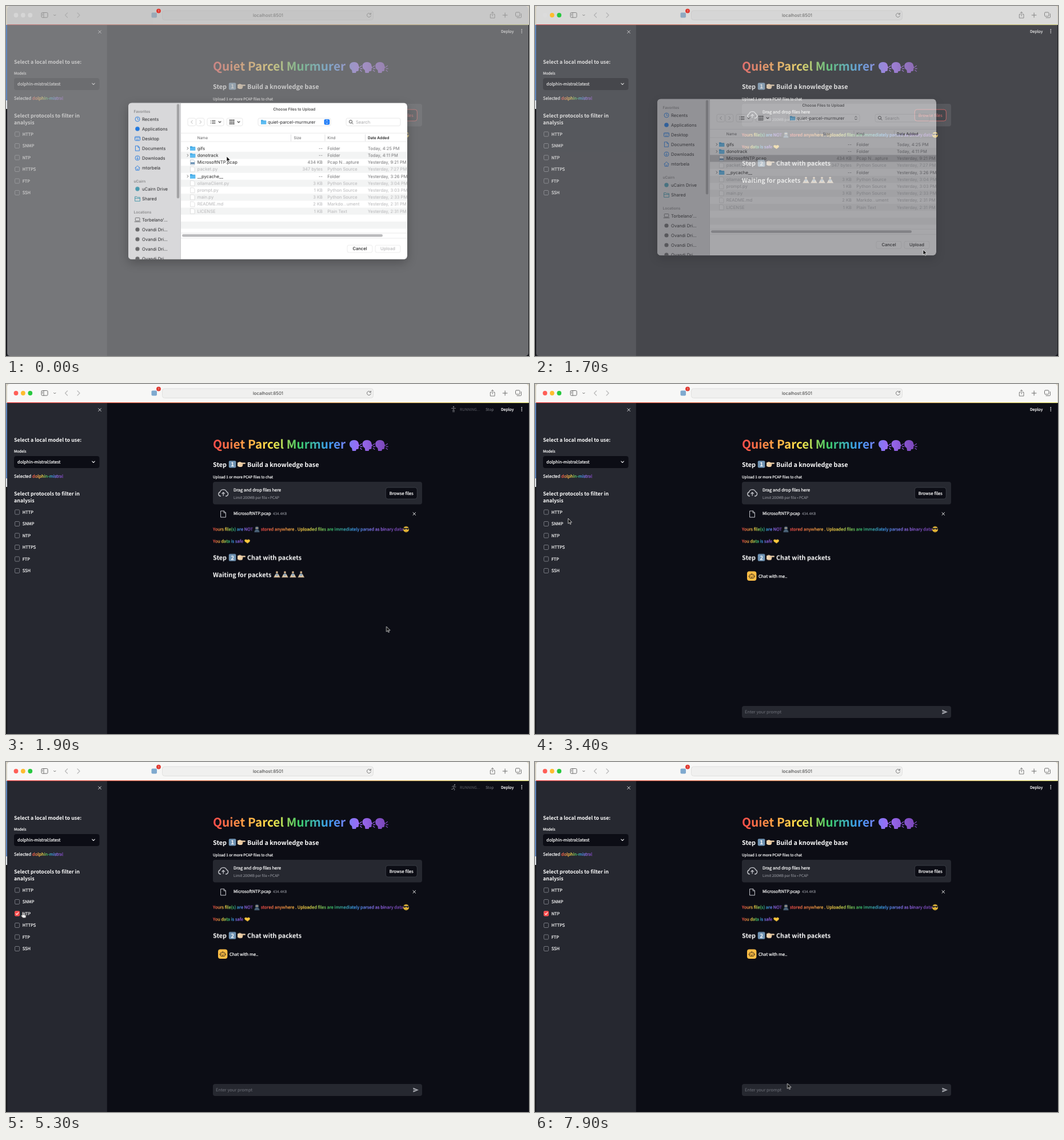
Write an HTML page that moves like this. It is 915 by 612 pixels and loops after 8 s.

```html
<!DOCTYPE html>
<html lang="en">
<head>
<meta charset="utf-8">
<title>Packet upload</title>
<style>
html,body{margin:0;width:100%;height:100%;overflow:hidden;background:#0c0d15}
svg{display:block;width:915px;height:612px;text-rendering:geometricPrecision}
text{white-space:pre}
.page{font-family:"Noto Sans CJK JP","Noto Sans CJK SC","Noto Sans CJK",Lato,sans-serif;font-weight:500;fill:#fafafa}
.page text{stroke-width:.22}
.page text:not([fill],.b){stroke:#fafafa}
.ui{font-family:Inter,"Liberation Sans",sans-serif}
.b{font-weight:700}
.ln{fill:none;stroke-linecap:round;stroke-linejoin:round}
.veil{animation:veil 8s linear infinite}
.sheet{animation:sheet 8s linear infinite}
.ptr{animation:ptr 8s ease-in-out infinite}
.lower{animation:lower 8s step-end infinite}
.pose{animation:pose .8s step-end infinite}
.pose2{animation-delay:-.4s}
@keyframes veil{0%,20%{opacity:.613}21.25%{opacity:.373}23.5%,100%{opacity:0}}
@keyframes sheet{0%,1.2%{transform:translateY(.8px);opacity:1}1.25%,20%{transform:none;opacity:1}
 21.25%{transform:translateY(-6px);opacity:.53}22.5%{transform:translateY(-9px);opacity:.1}
 23.5%,100%{transform:translateY(-10px);opacity:0}}
@keyframes lower{0%{transform:translateY(-28.6px)}22.4%{transform:none}}
@keyframes pose{0%{opacity:1}50%{opacity:0}}
@keyframes ptr{0%,3.7%{transform:translate(386px,263px)}6%,7.5%{transform:translate(384px,271px)}
 17.5%,21.6%{transform:translate(679px,426px)}23.7%,26%{transform:translate(665.5px,424px)}
 40%{transform:translate(62px,237px)}42.5%{transform:translate(58px,235px)}
 48.7%{transform:translate(44px,262px)}51.2%{transform:translate(37px,283px)}
 55%,67.5%{transform:translate(29.5px,262.5px)}74%{transform:translate(560px,470px)}
 80%,90.5%{transform:translate(445px,524px)}98.7%,100%{transform:translate(441.5px,562px)}}
</style>
</head>
<body>
<script>
const BODY = 7.5, SMALL = 6.42, HEAD = 10.85, SIDE = 8.9;
const PAGE = 'fill="#0c0d15"', PANEL = 'fill="#262830"';
let css = '', defs = '', count = 0;

const text = (x, y, s, size, attr = '') => `<text x="${x}" y="${y}" font-size="${size}" ${attr}>${s}</text>`;
const rect = (x, y, w, h, r, attr) => `<rect x="${x}" y="${y}" width="${w}" height="${h}" rx="${r}" ${attr}/>`;
const dot = (x, y, r, fill) => `<circle cx="${x}" cy="${y}" r="${r}" fill="${fill}"/>`;
const line = (d, color, w = 1) => `<path class="ln" d="${d}" stroke="${color}" stroke-width="${w}"/>`;
const shape = (d, fill) => `<path d="${d}" fill="${fill}"/>`;

// Shows its body between two times in ms.
function during(from, to, body) {
  const name = 'show' + count++;
  css += `@keyframes ${name}{0%{opacity:${from ? 0 : 1}}${from ? `${from / 80}%{opacity:1}` : ''}${to < 8000 ? `${to / 80}%{opacity:0}` : ''}100%{opacity:0}}`;
  return `<g style="animation:${name} 8s step-end infinite">${body}</g>`;
}

function rainbow(x1, x2) {
  const id = 'rain' + count++;
  const stops = ['#ff4b4b', '#ff9a45', '#ffe34a', '#3dc968', '#3d9df3', '#9a6cf5', '#7a45b5']
    .map((c, i) => `<stop offset="${i / 6}" stop-color="${c}"/>`).join('');
  defs += `<linearGradient id="${id}" gradientUnits="userSpaceOnUse" x1="${x1}" x2="${x2}" y1="0" y2="0">${stops}</linearGradient>`;
  return `url(#${id})`;
}

function rainText(x, y, s, w) {
  const paint = rainbow(x, x + w);
  return text(x, y, s, BODY, `fill="${paint}" stroke="${paint}"`);
}

// Browser toolbar
function toolbar() {
  const k = '#6b6b6b', pale = '#b9b9b9';
  return shape('M2 32.5V5Q2 0 7 0H909Q914 0 914 5V32.5Z', '#f7f7f6') +
    rect(273.5, 8, 369, 16.5, 4, 'fill="#f0f0ef" stroke="#e0e0df"') +
    rect(62, 11.5, 11, 8.6, 1.6, `fill="none" stroke="${k}"`) + line('M66 11.5V20M63.6 14H64.4M63.6 16H64.4', k, .9) +
    line('M83.6 15.3L85.3 17 87 15.3', k) +
    line('M107.5 12L103.5 16 107.5 20', pale, 1.2) + line('M125 12L129 16 125 20', pale, 1.2) +
    rect(254.5, 11.5, 9.5, 9, 2, 'fill="#7fa9cf"') +
    line('M638 14.2A3.5 3.5 0 1 0 638.4 17M638.4 12.2V14.6H636', k, .9) +
    line('M849 14.5H847.3V21H855V14.5H853.3M851.1 17.5V10.5M849 12.4L851.1 10.3 853.2 12.4', k, .9) +
    line('M869.2 16H877M873.1 12V20', k) +
    rect(891.5, 11, 7.5, 7, 1.5, `fill="none" stroke="${k}"`) + line('M894 20.5H900.3Q901.5 20.5 901.5 19.3V13.6', k, .9) +
    text(458.5, 18.8, 'localhost:8501', 7.8, 'class="ui" text-anchor="middle" fill="#3c3c3c"') +
    rect(2, 32, 912, 1.2, 0, 'fill="url(#stripe)"');
}

// Parts of the toolbar that the veil leaves bright
function lights() {
  const dots = (colors) => colors.map((c, i) => dot(17.5 + i * 12.4, 16, 3.9, c)).join('');
  const [red, yellow, green] = ['#ff5f57', '#febc2e', '#28c840'];
  return during(0, 1190, dots(['#d6d6d6', '#d6d6d6', '#d6d6d6'])) +
    during(1190, 1790, dots(['#dcdcdc', yellow, green])) +
    during(1790, 8000, dots([red, yellow, green])) +
    dot(267, 8.6, 3.9, '#e0382f') + text(267, 10.9, '!', 6, 'class="ui" text-anchor="middle" fill="#fff"');
}

// Page sidebar
function sidebar() {
  const box = (s, i) => rect(15.6, 220 + i * 20.5, 8, 8, 1.4, 'fill="none" stroke="#8b8d95" stroke-width=".8"') +
    text(28.7, 226.6 + i * 20.5, s, BODY);
  return line('M161.6 42.8L166.4 47.6M166.4 42.8L161.6 47.6', '#e8e8ea', .9) +
    text(14, 100.6, 'Select a local model to use:', SIDE, 'class="b"') +
    text(14, 120.3, 'Models', SMALL) +
    rect(14, 126, 149.5, 21, 4, PAGE) + text(20, 139, 'dolphin-mistral:latest', BODY) +
    line('M150.7 135.2L153 137.5 155.3 135.2', '#e8e8ea', 1.1) +
    text(14, 164, 'Selected', BODY) + rainText(46, 164, 'dolphin-mistral', 53) +
    text(14, 194.8, 'Select protocols to filter in', SIDE, 'class="b"') +
    text(14, 207, 'analysis', SIDE, 'class="b"') +
    ['HTTP', 'SNMP', 'NTP', 'HTTPS', 'FTP', 'SSH'].map(box).join('') +
    during(4590, 8000, rect(15.2, 260.6, 8.8, 8.8, 1.6, 'fill="#ff4b4b"') + line('M17.5 265.2L19 266.8 21.9 263.2', '#fff', 1.1));
}

// Small pictograms
const keycap = (y, n) => rect(389.8, y - 6.2, 12.6, 12.4, 2, 'fill="#6f93b3"') +
  text(396.1, y + 4, n, 10, 'class="b" text-anchor="middle"');
const point = (y) => `<g transform="translate(405 ${y})">` +
  shape('M0-3L4-4.5 8-3H12.6Q14-3 14-1.8T12.6-.6H9Q10 1 9 2.2 9 4.6 6.5 4.6H3L0 3Z', '#f1d3ac') +
  line('M5.5-.6H9M5.8 1.4H8.6', '#c39a6b', .5) + '</g>';
const talker = (x, fill) => shape(`M${x} 98c5 0 8 3 8 7l2 3-2 1v3c0 2-2 2-4 2l-1 3h-6l-1-5c-3-2-4-4-4-7 0-4 3-7 8-7z`, fill) +
  line(`M${x + 10.6} 106.5l2.6-2M${x + 11} 109.5h3M${x + 10.6} 112.3l2.6 2`, fill, 1.3);
const sitter = (x) => `<g transform="translate(${x} 333)">` + dot(0, -3.8, 1.9, '#d9b78f') +
  shape('M0-2L3 0 4.4 3.2 6 5H-6L-4.4 3.2-3 0Z', '#e8cda8') + shape('M-2.2-1.4H2.2V2.6H-2.2Z', '#8fa6b8') + '</g>';

function runner() {
  const c = '#74767d', head = (x, y) => dot(x, y, 1.2, c);
  return `<g class="pose">${head(783, 40) + line('M779.5 42.5H786.5M783 42.5V45.5M782 49V45.5M784 49V45.5', c, 1)}</g>` +
    `<g class="pose pose2">${head(785, 40) + line('M780.3 43.5L782 42 784.5 42.3 785.6 44 787 43.5M784 42.5L782.6 45.6 785 47 784.4 49.4M782.6 45.6L781.8 47.6H779.4', c, 1)}</g>` +
    text(794, 46.5, 'RUNNING...', 6.6, 'fill="#5d5f66"') + text(839, 46.5, 'Stop', 6.6, 'fill="#83858c"');
}

// Page body
function body() {
  const title = rainbow(362, 667);
  const heading = (y, n, s) => text(362, y + 4.3, 'Step', HEAD, 'class="b"') + keycap(y, n) + point(y) + text(422, y + 4.3, s, HEAD, 'class="b"');
  const browse = (edge, attr = '') => rect(664.3, 181, 55, 20, 4, `${PAGE} stroke="${edge}" stroke-width=".8"`) +
    text(691.8, 193.6, 'Browse files', BODY, 'text-anchor="middle" ' + attr);
  const agent = rect(371, 327.6, 16.4, 16.4, 4, 'fill="#ffbd45"') +
    rect(375.3, 333, 7.8, 6.6, 1.4, 'fill="none" stroke="#3a2f1a"') +
    line('M379.2 333V331.2M374 335.8V337M384.4 335.8V337M377.7 337.8H380.7', '#3a2f1a', .9) +
    dot(377.5, 335.6, .7, '#3a2f1a') + dot(380.9, 335.6, .7, '#3a2f1a');
  return during(1790, 3090, runner()) + during(4590, 5390, runner()) +
    text(866, 46.5, 'Deploy', 6.8) + [41.2, 44, 46.8].map(y => dot(902.3, y, .9, '#f0f0f0')).join('') +
    text(362, 113, 'Quiet Parcel Murmurer', 20.8, `class="b" fill="${title}"`) +
    [0, 1, 2].map(i => talker(609 + i * 22.6, title)).join('') +
    heading(140.4, 1, 'Build a knowledge base') +
    text(362, 165.2, 'Upload 1 or more PCAP files to chat', SMALL) +
    rect(362, 171, 366, 39.6, 4, PANEL) +
    line('M375.5 196H374.8A3.6 3.6 0 0 1 374.5 189 6 6 0 0 1 385.8 188.3 4 4 0 0 1 385.6 196H384.5M380.2 195V190M378 191.6L380.2 189.4 382.4 191.6', '#c9cad0', 1.3) +
    text(398, 187.8, 'Drag and drop files here', BODY) +
    text(398, 200.8, 'Limit 200MB per file • PCAP', SMALL, 'fill="#a3a5ad"') +
    during(0, 1790, browse('#ff4b4b', 'fill="#ff4b4b"')) +
    during(1790, 8000, browse('#41444c') +
      line('M376 222H381.4L384.4 225V233H376ZM381.2 222V225.2H384.4', '#c9cad0', 1) +
      text(398, 228.6, 'MicrosoftNTP.pcap', BODY) + text(467, 228.6, '434.4KB', SMALL, 'fill="#a3a5ad"') +
      line('M712 224.7L716.6 229.3M716.6 224.7L712 229.3', '#f0f0f0', 1)) +
    '<g class="lower">' +
    rainText(362, 256.8, 'Yours file(s) are NOT', 69) +
    dot(439, 252, 3.2, '#3d5266') + shape('M434.4 259Q434.6 254.5 439 254.5T443.6 259Z', '#4d667c') + rect(436.6, 251, 4.8, 1.6, .8, 'fill="#e3c49c"') +
    rainText(446, 256.8, 'stored anywhere . Uploaded files are immediately parsed as binary data', 246) +
    dot(700, 254, 5, '#ffcb3d') + shape('M695 251.5H705L704 254.5H701L700 252.7 699 254.5H696Z', '#26262b') + line('M697.8 256.6Q700 258 702.2 256.6', '#8a5a14', .7) +
    rainText(362, 277.7, 'You data is safe', 53) +
    shape('M417 273L419.5 271.5 422 272.6 424.5 271.5 427 273 426.4 275.6 422.6 278.6 418 275.6Z', '#ffc83d') +
    heading(303.3, 2, 'Chat with packets') +
    during(0, 3090, text(362, 337.2, 'Waiting for packets', HEAD, 'class="b"') + [474, 488, 502, 516.3].map(sitter).join('')) + '</g>' +
    during(3090, 8000, agent + text(391, 338.6, 'Chat with me..', BODY) +
      rect(362, 563, 366, 21, 4, PANEL) + text(367, 576.2, 'Enter your prompt', BODY, 'fill="#6f717a"') +
      shape('M712.4 569.6L722 573.6 712.4 577.6V574.6L718 573.6 712.4 572.6Z', '#a5a7ae'));
}

// File dialog
const folder = (x, y) => shape(`M${x} ${y - 3.6}h3.4l1 1h4.8v6.6h-9.2z`, '#2f9cdd') + rect(x, y - 1.7, 9.2, 5.7, .8, 'fill="#5cbcf2"');
const sheetIcon = (x, y, c) => shape(`M${x} ${y - 4.4}h4.8l2.2 2.2v6.6h-7z`, '#fff') + line(`M${x} ${y - 4.4}h4.8l2.2 2.2v6.6h-7z`, c, .6);
const chevron = (x, y) => line(`M${x - 2} ${y - 1}l2 2 2-2`, '#444', 1.1);

const files = [
  ['gifs', '--', 'Folder', 'Today, 4:25 PM', 1], ['donotrack', '--', 'Folder', 'Today, 4:11 PM', 1],
  ['MicrosoftNTP.pcap', '434 KB', 'Pcap N...apture', 'Yesterday, 9:21 PM', 2],
  ['packet.py', '347 bytes', 'Python Source', 'Yesterday, 7:27 PM'], ['__pycache__', '--', 'Folder', 'Yesterday, 3:26 PM', 1],
  ['ollamaClient.py', '3 KB', 'Python Source', 'Yesterday, 3:04 PM'], ['prompt.py', '1 KB', 'Python Source', 'Yesterday, 3:03 PM'],
  ['main.py', '3 KB', 'Python Source', 'Yesterday, 2:33 PM'], ['README.md', '2 KB', 'Markdo...ument', 'Yesterday, 2:31 PM'],
  ['LICENSE', '1 KB', 'Plain Text', 'Yesterday, 2:31 PM']
];
const rowY = (i) => 248.1 + i * 12.2;
const band = (i, fill) => rect(306, rowY(i) - 6.1, 396, 12.2, 0, `fill="${fill}"`);

function fileRow(i, strong, soft) {
  const [name, size, kind, date, type] = files[i], y = rowY(i), b = y + 2.7;
  const icon = type === 1 ? folder(322, y) + line(`M317 ${y - 2}l2 2-2 2`, '#666', .9)
    : sheetIcon(323, y, type ? '#8aa0b4' : '#cfcfcf') + (type ? rect(323, y, 7, 3, 0, 'fill="#5a86ad"') : '');
  return icon + text(334.7, b, name, 7.7, `fill="${strong}"`) + text(554, b, size, 7.55, `fill="${soft}" text-anchor="end"`) +
    text(562.3, b, kind, 7.55, `fill="${soft}"`) + text(633, b, date, 7.55, `fill="${soft}"`);
}

function places() {
  const c = '#1f78e0', g = '#6a6a6c';
  const item = (y, s, icon) => icon + text(238, y + 2.7, s, 7.7, 'fill="#262628"');
  const head = (y, s) => text(223.5, y + 2.3, s, 6.5, 'font-weight="600" fill="#88888a"');
  const ring = (y) => `<circle cx="230" cy="${y}" r="4" fill="none" stroke="${c}" stroke-width=".9"/>`;
  const drive = (y) => item(y, 'Ovandi Dri...', dot(230, y, 3.6, g));
  return head(183.4, 'Favorites') +
    item(197, 'Recents', ring(197) + line('M230 194.5V197.2H232', c, .8)) +
    item(214, 'Applications', dot(230, 214, 3.8, c)) +
    item(231, 'Desktop', rect(225.5, 227.5, 9, 7, 1.2, `fill="none" stroke="${c}" stroke-width=".9"`) + line('M226 229.5H234M227.5 232.8H232.5', c, .8)) +
    item(248, 'Documents', line('M226.8 243.8H231L233.4 246.2V252.3H226.8ZM231 244V246.4H233.2', c, .9)) +
    item(265, 'Downloads', ring(265) + line('M230 262.8V267M228.4 265.6L230 267.2 231.6 265.6', c, .8)) +
    item(282.3, 'mtorbela', line('M225.8 282.4L230 278.5 234.2 282.4M227 281.6V286.2H233V281.6M230 286V283.6', c, .9)) +
    head(305.2, 'uCairn') + item(319, 'uCairn Drive', dot(230, 319, 3.7, '#4a9bb0')) +
    item(336, 'Shared', line('M225.6 340V332.6H229L230 333.8H234.4V340ZM225.6 335.6H234.4', '#3c93a8', .9)) +
    head(359.2, 'Locations') +
    item(373, "Torbelano'...", rect(226.3, 369.5, 7.6, 5.4, .8, `fill="none" stroke="${g}" stroke-width=".9"`) + line('M225 376.4H235', g, 1)) +
    [390, 407, 424, 441].map(drive).join('');
}

function button(x, label, fill, color) {
  return rect(x, 417.4, 44, 12.8, 3, `fill="${fill}" stroke="#000" stroke-opacity=".13" stroke-width=".6"`) +
    text(x + 22, 426.4, label, 7.6, `font-weight="500" text-anchor="middle" fill="${color}"`);
}

function dialog() {
  const frame = (x, w) => rect(x, 195.3, w, 13.4, 3, 'fill="#fff" stroke="#dedede" stroke-width=".7"');
  const th = (x, s, a = 'fill="#5c5c5e"') => text(x, 232.3, s, 6.6, a);
  const stepper = (c) => line('M559.6 200.8L561.4 199 563.2 200.8M559.6 203.2L561.4 205 563.2 203.2', c, .9);
  let s = rect(214, 168.6, 488, 273.6, 6, 'fill="#fff"') + rect(214, 168.6, 92, 273.6, 0, 'fill="#d8d8da"') +
    rect(305.4, 168.6, .6, 273.6, 0, 'fill="#c2c2c4"') + places() +
    rect(298.8, 170.5, 4.4, 165, 2.2, 'fill="#a2a2a4"') +
    text(504.3, 181.6, 'Choose Files to Upload', 6.7, 'text-anchor="middle" font-weight="500" fill="#333"') +
    frame(318, 14) + frame(333, 14) + line('M326.3 199.3L323.6 202 326.3 204.7M339 199.3L341.7 202 339 204.7', '#b5b5b5', 1) +
    frame(352, 29) + line('M360.5 199.5H366M360.5 202H366M360.5 204.5H366M358 199.5H358.2M358 202H358.2M358 204.5H358.2', '#444', 1) + chevron(374, 202) +
    frame(386, 28);
  for (let i = 0; i < 9; i++) s += rect(391 + i % 3 * 3.1, 197.8 + (i / 3 | 0) * 3.1, 2.3, 2.3, .4, 'fill="#555"');
  s += chevron(407, 202) + frame(441, 127) + folder(446, 202) + text(458, 204.6, 'quiet-parcel-murmurer', 7.7, 'fill="#262628"') +
    during(0, 1650, rect(556.6, 197.2, 9.6, 9.6, 2, 'fill="#1a7af8"') + stepper('#fff')) +
    during(1650, 8000, stepper('#333')) +
    frame(595, 95) + '<circle cx="603" cy="201.4" r="2.6" fill="none" stroke="#444"/>' + line('M605 203.4L607 205.4', '#444') +
    text(612, 204.7, 'Search', 7.6, 'fill="#a8a8aa"') +
    line('M306 221.5H702M306 236.2H702M306 396.2H702M306 405.3H702', '#dedee0', .6) +
    line('M498.5 224V235M558 224V235M628.5 224V235', '#d2d2d4', .7) +
    th(334.7, 'Name') + th(503.5, 'Size') + th(562.3, 'Kind') + th(633, 'Date Added', 'font-weight="600" fill="#222"');
  for (let i = 1; i < 12; i += 2) s += band(i, '#f3f4f4');
  s += during(1650, 8000, band(2, '#c0c0c2'));
  files.forEach((f, i) => { s += f[4] ? fileRow(i, '#222', '#727274') : fileRow(i, '#b6b6b8', '#b6b6b8'); });
  s += during(490, 1650, band(2, '#0a5cdb') + fileRow(2, '#fff', '#fff')) +
    rect(308, 398.2, 351, 4.6, 2.3, 'fill="#b9b9bb"') +
    button(597, 'Cancel', '#fff', '#222') +
    during(0, 490, button(646, 'Upload', '#fff', '#b8b8ba')) +
    during(490, 1650, button(646, 'Upload', '#0a7aff', '#fff')) +
    during(1650, 8000, button(646, 'Upload', '#fff', '#222'));
  return `<g class="sheet ui"><rect x="214" y="168.6" width="488" height="273.6" rx="6" filter="url(#shade)" opacity=".25"/><g clip-path="url(#sheet)">${s}</g></g>`;
}

function pointer() {
  const arrow = '<path d="M0 0V9.2L2.2 7.2 3.6 10.4 5 9.8 3.6 6.7H6.5Z" fill="#111" stroke="#fff" stroke-width=".7"/>';
  const hand = '<path d="M-1 .8a1 1 0 0 1 2 0V4.5L4.5 5.2a1.3 1.3 0 0 1 1 1.4L5 10H0L-3 6.6a.9 .9 0 0 1 1.3-1.2L-1 6Z" fill="#fff" stroke="#222" stroke-width=".6"/>';
  return `<g class="ptr">${during(0, 4350, arrow) + during(4350, 5490, hand) + during(5490, 8000, arrow)}</g>`;
}

const scene =
  rect(0, 0, 915, 612, 0, 'fill="#15161a"') + rect(0, 0, 915, 33, 0, 'fill="#d5d0c2"') +
  rect(0, 33, 2, 132, 0, 'fill="#5f86bd"') + rect(0, 165, 2, 15, 0, 'fill="#dfe3e8"') +
  rect(2, 32.5, 912, 579.5, 0, PAGE) + rect(2, 32.5, 174.8, 579.5, 0, PANEL) +
  toolbar() + `<g class="page">${sidebar() + body()}</g>` +
  rect(2, 0, 912, 612, 5, 'class="veil" fill="#aaa"') + lights() + dialog() + pointer();

defs += '<linearGradient id="stripe"><stop stop-color="#ff4b4b"/><stop offset="1" stop-color="#fffd80"/></linearGradient>' +
  '<clipPath id="sheet"><rect x="214" y="168.6" width="488" height="273.6" rx="6"/></clipPath>' +
  '<filter id="shade" x="-20%" y="-20%" width="140%" height="150%"><feOffset dy="6"/><feGaussianBlur stdDeviation="9"/></filter>';

document.body.innerHTML = `<style>${css}</style><svg viewBox="0 0 915 612"><defs>${defs}</defs>${scene}</svg>`;
</script>
</body>
</html>
```
